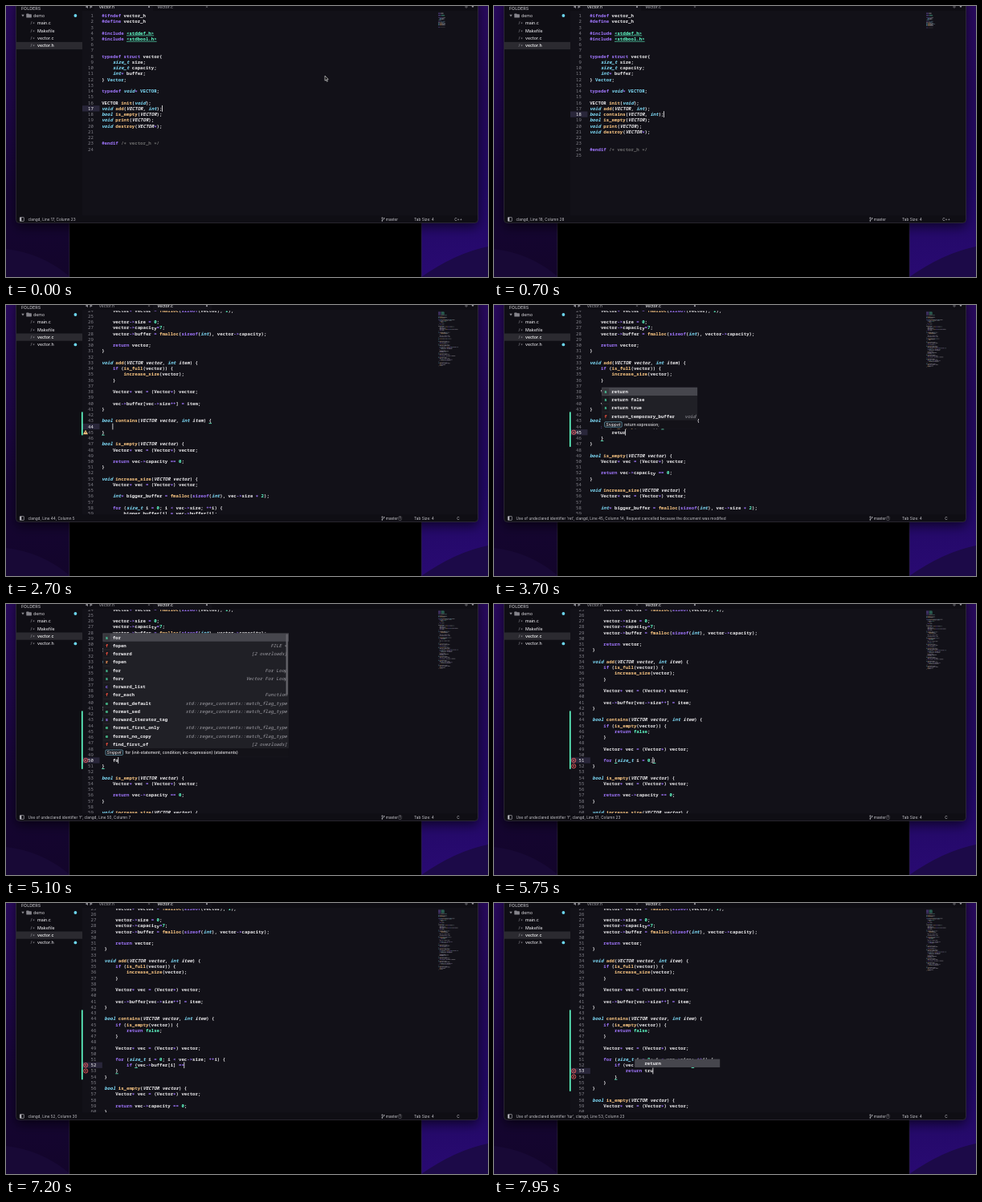
An HTML page with a canvas for the animation above (8000 ms loop, 600 by 338 pixels).

```html
<!DOCTYPE html>
<html lang="en">
<head>
<meta charset="utf-8">
<style>
html, body { margin: 0; width: 100%; height: 100%; overflow: hidden; background: #000; }
canvas { display: block; width: 600px; height: 338px; }
</style>
</head>
<body>
<canvas id="stage"></canvas>
<script>
const LOOP = 8000, TICK = 50, CW = 3.42, ROW = 7.24, SCROLL = 171.8;
const MONO = '"Noto Sans Mono", "DejaVu Sans Mono", monospace', SANS = 'Inter, sans-serif';
const C = { text: '#edecee', purple: '#a277ff', green: '#61ffca', orange: '#ffca85', blue: '#82e2ff', grey: '#6d6d6d', bg: '#121118' };

const canvas = document.getElementById('stage');
const ctx = canvas.getContext('2d');
const dpr = window.devicePixelRatio || 1;
canvas.width = 600 * dpr;
canvas.height = 338 * dpr;

const header = [`#ifndef vector_h
#define vector_h

#include <stddef.h>
#include <stdbool.h>


typedef struct vector{
    size_t size;
    size_t capacity;
    int* buffer;
} Vector;

typedef void* VECTOR;

VECTOR init(void);
void add(VECTOR, int);`, `
bool is_empty(VECTOR);
void print(VECTOR);
void destroy(VECTOR*);


#endif /* vector_h */
`];

const source = [`#include <stdio.h>
#include <stdlib.h>
#include <stdint.h>
#include "vector.h"
`, `
#define LOAD_FACTOR (0.75)`, `

/* private */
void increase_size(VECTOR);
bool is_full(VECTOR);


static void* fmalloc(size_t size, uint8_t length) {
    void* object = malloc(size * length);

    if (object == NULL) {
        exit(1);
    }

    return object;
}

VECTOR init(void) {
    Vector* vector = fmalloc(sizeof(Vector), 1);

    vector->size = 0;
    vector->capacity=7;
    vector->buffer = fmalloc(sizeof(int), vector->capacity);

    return vector;
}

void add(VECTOR vector, int item) {
    if (is_full(vector)) {
        increase_size(vector);
    }

    Vector* vec = (Vector*) vector;

    vec->buffer[vec->size++] = item;
}`, `

bool is_empty(VECTOR vector) {
    Vector* vec = (Vector*) vector;

    return vec->capacity == 0;
}

void increase_size(VECTOR vector) {
    Vector* vec = (Vector*) vector;

    int* bigger_buffer = fmalloc(sizeof(int), vec->size * 2);

    for (size_t i = 0; i < vec->size; ++i) {
        bigger_buffer[i] = vec->buffer[i];
    }

    free(vec->buffer);
    vec->buffer = bigger_buffer;
    vec->capacity *= 2;
}

bool is_full(VECTOR vector) {
    Vector* vec = (Vector*) vector;

    return vec->size >= vec->capacity * LOAD_FACTOR;
}

void print(VECTOR vector) {
    Vector* vec = (Vector*) vector;

    for (size_t i = 0; i < vec->size; ++i) {
        printf("%d ", vec->buffer[i]);
    }
}

void destroy(VECTOR* vector) {
    Vector* vec = (Vector*) *vector;

    free(vec->buffer);
    free(vec);
}
`];

// Each step: start time, ms per key, typed text, text kept after the caret.
const headerKeys = [[50, 24, '\nbool contains(VECTOR, int);', '']];
const sourceKeys = [
  [1900, 16, '\n\nbool contains(VECTOR vector, int item) {', ''],
  [2600, 0, '\n    ', '\n}'],
  [2750, 25, 'if (is_empty(vector)) {', '\n}'],
  [3400, 0, '\n        ', '\n    }\n}'],
  [3500, 50, 'return false;', '\n    }\n}'],
  [4200, 0, '\n    }', '\n}'],
  [4250, 18, '\n\n    Vector* vec = (Vector*) vector;\n\n    ', '\n}'],
  [5050, 40, 'for ', '\n}'],
  [5210, 40, '(size_t i = 0; i < vec->size; ++', ')\n}'],
  [6500, 50, 'i', ')\n}'],
  [6550, 50, ') {', '\n}'],
  [6700, 0, '\n        ', '\n    }\n}'],
  [6750, 22, 'if (vec->buffer[i] == item) {', '\n    }\n}'],
  [7400, 0, '\n            ', '\n        }\n    }\n}'],
  [7500, 50, 'return tru', '\n        }\n    }\n}']
];

const SWITCH = 1050, IMPORT = 5450;

function typed(keys, t) {
  let before = '', after = '';
  for (const [at, ms, text, rest] of keys) {
    if (t < at) break;
    before += text.slice(0, ms ? Math.floor((t - at) / ms) + 1 : text.length);
    after = rest;
  }
  return [before, after];
}

function documentAt(t) {
  if (t < SWITCH) {
    const [a, b] = typed(headerKeys, t);
    return { before: header[0] + a, after: b + header[1] };
  }
  const top = source[0] + (t >= IMPORT ? '#include <stddef.h>\n' : '') + source[1];
  if (t < 1850) return { before: top, after: source[2] + source[3] };
  const [a, b] = typed(sourceKeys, t);
  return { before: top + source[2] + a, after: b + source[3], blockEnd: (top + source[2] + a + b).split('\n').length };
}

// Position of the brackets around the caret, as offsets.
function brackets(all, caret) {
  const open = '([{', close = ')]}';
  let depth = 0, i = caret - 1, j = caret;
  if (close.includes(all[i] || ' ')) { j = i; i--; }
  for (; i >= 0; i--) {
    if (close.includes(all[i])) depth++;
    else if (open.includes(all[i]) && depth-- === 0) break;
  }
  if (i < 0) return [];
  depth = 0;
  for (; j < all.length; j++) {
    if (open.includes(all[j])) depth++;
    else if (close.includes(all[j]) && depth-- === 0) break;
  }
  return [i, j];
}

function tokens(line) {
  const out = [];
  const paren = line.indexOf('(');
  const signature = /^(static|void|bool|VECTOR)\b.*\(/.test(line);
  const re = /\/\*.*?\*\/|"[^"]*"|<\w+\.h>|#\w+|[A-Za-z_]\w*|\d[\d.]*|[-+*=<>]+|[^\s\w]/g;
  for (const m of line.matchAll(re)) {
    const s = m[0], i = m.index;
    let color = C.text, italic = false, under = false;
    if (s.startsWith('/*')) color = C.grey;
    else if (/^["<]\w/.test(s)) { color = C.green; under = line[0] === '#'; }
    else if (/^(#\w+|typedef|struct|static|return|if|for|sizeof)$/.test(s)) color = C.purple;
    else if (/^(void|int|bool|size_t|uint8_t)$/.test(s)) { color = C.blue; italic = true; }
    else if (/^(\d|NULL$|true$|false$)/.test(s)) color = C.green;
    else if (/^[-+*=<>]/.test(s)) color = C.purple;
    else if (/^\w/.test(s)) {
      if (/^(typedef void|})/.test(line)) color = C.blue;
      else if (line[i + s.length] === '(') color = C.orange;
      else italic = signature && i > paren;
    }
    out.push({ s, i, color, italic, under });
  }
  return out;
}

function rect(x, y, w, h, color) {
  ctx.fillStyle = color;
  ctx.fillRect(x, y, w, h);
}

function round(x, y, w, h, r, fill, stroke) {
  ctx.beginPath();
  ctx.roundRect(x, y, w, h, r);
  if (fill) { ctx.fillStyle = fill; ctx.fill(); }
  if (stroke) { ctx.strokeStyle = stroke; ctx.lineWidth = 0.6; ctx.stroke(); }
}

function dot(x, y, r, color) {
  ctx.beginPath();
  ctx.arc(x, y, r, 0, 7);
  ctx.fillStyle = color;
  ctx.fill();
}

function stroke(points, color, width = 0.7) {
  ctx.beginPath();
  points.forEach(([x, y], i) => i ? ctx.lineTo(x, y) : ctx.moveTo(x, y));
  ctx.strokeStyle = color;
  ctx.lineWidth = width;
  ctx.stroke();
}

function poly(points, color) {
  ctx.beginPath();
  points.forEach(([x, y]) => ctx.lineTo(x, y));
  ctx.closePath();
  ctx.fillStyle = color;
  ctx.fill();
}

// Scaling and an invisible tilt keep small type off the pixel grid.
function label(s, x, y, size, color, { style = '', family = SANS, align = 'left' } = {}) {
  ctx.save();
  ctx.translate(x, y + size * 0.36);
  ctx.rotate(0.0004);
  ctx.scale(0.1, 0.1);
  ctx.font = `${style} ${size * 10}px ${family}`;
  ctx.textAlign = align;
  ctx.fillStyle = color;
  ctx.fillText(s, 0, 0);
  ctx.restore();
}

const mono = (s, x, y, color, { style = '600', ...opts } = {}) =>
  label(s.replace(/\*/g, '∗'), x, y, 5.7, color, { family: MONO, style, ...opts });

function cross(x, y, r, color) {
  stroke([[x - r, y - r], [x + r, y + r]], color);
  stroke([[x + r, y - r], [x - r, y + r]], color);
}

function gradient(x0, y0, x1, y1, ...stops) {
  const g = ctx.createLinearGradient(x0, y0, x1, y1);
  stops.forEach((color, i) => g.addColorStop(i / (stops.length - 1), color));
  return g;
}

function wallpaper() {
  rect(0, 0, 300, 338, gradient(0, 0, 0, 338, '#28095c', '#1f074b', '#150533', '#13052b'));
  rect(300, 0, 300, 338, gradient(0, 0, 0, 338, '#28095c', '#220858', '#200862', '#290a72'));
  ctx.beginPath();
  ctx.moveTo(0, 303);
  ctx.quadraticCurveTo(45, 308, 80, 338);
  ctx.lineTo(0, 338);
  ctx.fillStyle = '#180936';
  ctx.fill();
  ctx.beginPath();
  ctx.moveTo(517, 338);
  ctx.quadraticCurveTo(560, 308, 600, 300);
  ctx.lineTo(600, 338);
  ctx.fillStyle = '#1c0a48';
  ctx.fill();
  rect(79, 262, 438, 76, '#000');
  stroke([[78.8, 262], [78.8, 338]], '#2c2638');
  stroke([[517.2, 262], [517.2, 338]], '#2c2638');
  ctx.save();
  ctx.shadowColor = 'rgba(0,0,0,.6)';
  ctx.shadowBlur = 14 * dpr;
  ctx.shadowOffsetY = 5 * dpr;
  round(12.5, -10, 575, 280.5, 4, C.bg);
  ctx.restore();
}

function sidebar(t) {
  rect(13, 0, 82, 261, '#0f0e14');
  label('FOLDERS', 19, 2.6, 5.3, '#a5a4aa', { style: '600' });
  poly([[19.3, 10.8], [22.7, 10.8], [21, 13.4]], '#8b8a91');
  round(25.3, 9.6, 3.2, 2, 0.5, '#85848b');
  round(25.3, 10.3, 6.6, 4.3, 0.6, '#85848b');
  label('demo', 34, 12.2, 5.3, '#dddce0');
  dot(86.4, 12, 1.9, '#6bd5ee');
  const active = t < SWITCH ? 3 : 2;
  ['main.c', 'Makefile', 'vector.c', 'vector.h'].forEach((name, i) => {
    const y = 21.3 + i * 9.4;
    if (i === active) rect(13, y - 4.6, 82, 9.2, '#2b2a30');
    label('/∗', 30, y, 5, '#a09fa6', { family: MONO });
    label(name, 39, y, 5.3, i === active ? '#fff' : '#dddce0', { style: '500' });
  });
  if (t >= 900) dot(86.4, 49.4, 1.9, '#6bd5ee');
}

function tabs(t) {
  const first = t < SWITCH;
  rect(95, 0, 492, 6, '#0e0d13');
  rect(first ? 110 : 183, 0, 73, 6, C.bg);
  poly([[102, -1], [102, 3], [98.6, 1]], '#88878e');
  poly([[104.5, -1], [104.5, 3], [107.9, 1]], '#88878e');
  label('vector.h', 116, 0.9, 5, first ? '#fff' : '#a3a2a8');
  label('vector.c', 188.5, 0.9, 5, first ? '#a3a2a8' : '#fff', { style: '500' });
  const mark = (x, dirty) => dirty ? dot(x, 1.2, 1.1, '#96959c') : cross(x, 1.2, 1, '#6f6e75');
  mark(178, t < 800);
  mark(250, t >= 1900);
  stroke([[571, 1], [575, 1]], '#77767d');
  stroke([[573, -1], [573, 3]], '#77767d');
  poly([[579.5, 0], [582.5, 0], [581, 2.2]], '#98979e');
}

function errorMark(y) {
  ctx.beginPath();
  ctx.arc(99.2, y, 2.6, 0, 7);
  ctx.strokeStyle = '#ff6767';
  ctx.lineWidth = 0.8;
  ctx.stroke();
  cross(99.2, y, 1.1, '#ff6767');
}

function warningMark(y) {
  poly([[99, y - 3], [102, y + 2.5], [96, y + 2.5]], '#ffca85');
  stroke([[99, y - 1.2], [99, y + 1]], '#302818', 0.8);
}

function editor(t, doc) {
  const all = doc.before + doc.after, lines = all.split('\n');
  const shift = t >= IMPORT ? CW : 0, x0 = 119.2 + shift;
  const p = Math.min(1, Math.max(0, (t - 1520) / 180));
  const scroll = t < SWITCH ? 0 : SCROLL * p * p * (3 - 2 * p) + (shift ? ROW : 0);
  const rowY = i => 12 + i * ROW - scroll;
  const place = offset => {
    const part = all.slice(0, offset).split('\n');
    return { row: part.length - 1, col: part.at(-1).length };
  };
  const caret = place(doc.before.length);
  const cy = rowY(caret.row), cx = x0 + caret.col * CW;

  ctx.save();
  ctx.beginPath();
  ctx.rect(94, 7.2, 493, 253.8);
  ctx.clip();
  rect(95, cy - 3.6, 21.5 + shift, ROW, '#29263a');

  if (doc.blockEnd && t >= 1900) {
    const top = rowY(t >= IMPORT ? 42 : 41) - 3.6;
    rect(94, top, 1.6, Math.max(0, rowY(doc.blockEnd - 1) + 3.6 - top), C.green);
  }

  lines.forEach((line, i) => {
    const y = rowY(i), toks = tokens(line);
    if (y > 0 && y < 268) {
      mono(String(i + 1), 108.9 + shift, y, i === caret.row ? '#fff' : '#85848c', { align: 'right', style: '500' });
      for (const k of toks) {
        const x = x0 + k.i * CW;
        mono(k.s, x, y, k.color, { style: k.italic ? 'italic 600' : '600' });
        if (k.under) rect(x, y + 2.9, k.s.length * CW, 0.6, k.color);
      }
    }
    ctx.globalAlpha = 0.5;
    for (const k of toks) rect(538 + k.i * 0.41, 8.6 + i * 0.79, k.s.length * 0.41, 0.55, k.color);
    ctx.globalAlpha = 1;
  });

  for (const b of brackets(all, doc.before.length)) {
    const q = place(b);
    rect(x0 + q.col * CW, rowY(q.row) + 3, CW, 0.8, C.green);
  }
  rect(cx - 0.4, cy - 3.9, 0.8, 7.8, '#f4f3f6');

  if (t >= 2600 && t < 2800) warningMark(cy + ROW);
  if ((t >= 3550 && t < 4150) || t >= 5050) errorMark(cy);
  if (t >= 5500) errorMark(cy + ROW);
  ctx.restore();
  return { caret, cx, cy };
}

const returnItems = ['s return', 's return false', 's return true', 'f return_temporary_buffer|void'];
const MATCH = '|std::regex_constants::match_flag_type';
const forItems = ['s for', 'f fopen|FILE *', 'f forward|[2 overloads]', 'r fopen', 's for|For Loop', 's forv|Vector For Loop',
  'c forward_list', 'f for_each|Function', 'e format_default' + MATCH, 'e format_sed' + MATCH, 't forward_iterator_tag',
  'e format_first_only' + MATCH, 'e format_no_copy' + MATCH, 'f find_first_of|[2 overloads]'];
const kinds = { s: '#4fe0ac', f: '#f4503f', r: '#ff9c5a', c: '#8f6bff', e: '#55ecac', t: '#a277ff' };

function popup(items, wordX, lineY, width, note) {
  const pitch = 10.25, left = wordX - 12.4, foot = note ? 10.5 : 0;
  const h = items.length * pitch + foot, top = lineY - 4.5 - h;
  rect(left, top, width, h, '#202026');
  rect(left, top, width, pitch, '#46464d');
  items.forEach((item, i) => {
    const [name, info] = item.slice(2).split('|');
    const y = top + (i + 0.5) * pitch, kind = item[0];
    if (kinds[kind]) {
      rect(left + 1, y - 4.3, 8, 8.6, 'rgba(0,0,0,.22)');
      mono(kind === 't' ? 's' : kind, left + 3.2, y, kinds[kind], { style: 'bold' });
    }
    mono(name, wordX - 0.2, y, '#f1f0f3', { style: 'bold' });
    if (info) mono(info, left + width - 2, y, '#a2a1a8', { style: 'italic 500', align: 'right' });
  });
  if (items.length > 8) round(left + width - 3.4, top + 1, 2.2, 76, 1, '#66656c');
  if (note) {
    const y = top + h - foot / 2;
    rect(left, top + h - foot, width, foot, '#131218');
    round(left + 3.5, y - 3.2, 21.5, 6.4, 1, null, '#82cbe2');
    label('Snippet', left + 14.2, y, 5, '#e8e7ea', { style: 'italic 500', align: 'center' });
    label(note, left + 28, y, 5, '#e8e7ea', { style: '500' });
  }
}

function popups(t, { cx, cy }) {
  if (t >= 3550 && t < 3850) popup(returnItems, cx - CW * (Math.floor((t - 3500) / 50) + 1), cy, 119, 'return expression;');
  if (t >= 5050 && t < 5170) popup(forItems, cx - CW * (Math.floor((t - 5050) / 40) + 1), cy, 231.5, 'for (init-statement; condition; inc-expression) (statements)');
  if (t >= 7850) popup(['- return'], cx - CW * (Math.floor((t - 7850) / 50) + 1), cy, 106);
}

function statusBar(t, { caret }) {
  rect(13, 261.3, 574, 8.7, '#0f0e14');
  round(17.3, 263.6, 5, 4.8, 0.5, null, '#c5c4ca');
  rect(17.5, 263.8, 1.7, 4.4, '#c5c4ca');
  let s = `clangd, Line ${caret.row + 1}, Column ${caret.col + 1}`;
  if (t >= 800 && t < 1900) s += '; Saved ~/demo/vector.h (UTF-8)';
  const wrong = t >= 7900 ? 'tur' : t >= 6000 && t < 6700 ? 'O' : t >= 5100 && t < 6000 ? 'f' : t >= 3600 && t < 4150 ? 'ret' : '';
  if (wrong) s = `Use of undeclared identifier '${wrong}', ${s}`;
  if (wrong === 'ret' && t < 3800) s += '; Request cancelled because the document was modified';
  const ink = '#c9c8ce';
  label(s, 27.5, 266, 4.7, ink);
  dot(468.3, 264.2, 0.7, ink);
  dot(468.3, 268, 0.7, ink);
  dot(470.6, 264.8, 0.7, ink);
  stroke([[468.3, 264], [468.3, 268]], ink, 0.5);
  stroke([[470.6, 265], [470.1, 266.4], [468.3, 266.8]], ink, 0.5);
  label('master', 472.8, 266, 4.7, ink);
  if (t >= 900) {
    round(488.6, 263.7, 3.6, 4.8, 1, null, '#6f6e75');
    label('1', 490.4, 266.1, 3.6, ink, { align: 'center' });
  }
  label('Tab Size: 4', 508, 266, 4.75, ink);
  label(t < SWITCH ? 'C++' : 'C', 563, 266, 4.7, ink, { align: 'center' });
}

const pointerPath = [[0, 397, 87], [750, 397, 87], [1000, 200, 2], [1100, 200, 2], [1450, 178, 193], [1600, 178, 193], [1800, 124, 130], [1900, 124, 130]];

function pointer(t) {
  if ((t >= 50 && t < 750) || t >= 1900) return;
  const k = pointerPath.findIndex(p => p[0] > t);
  const [ta, xa, ya] = pointerPath[k - 1], [tb, xb, yb] = pointerPath[k];
  const u = (t - ta) / (tb - ta), e = u * u * (3 - 2 * u);
  const x = xa + (xb - xa) * e, y = ya + (yb - ya) * e;
  if (t < 1150) {
    const shape = [[0, 0], [0, 6.2], [1.4, 5], [2.4, 7.2], [3.4, 6.8], [2.4, 4.6], [4.2, 4.4]].map(([a, b]) => [x + a, y + b]);
    poly(shape, '#111');
    stroke([...shape, shape[0]], '#eee', 0.6);
  } else {
    for (const [color, w] of [['#000', 1.8], ['#eee', 0.8]]) {
      stroke([[x, y - 3], [x, y + 3]], color, w);
      stroke([[x - 1.6, y - 3.4], [x + 1.6, y - 3.4]], color, w);
      stroke([[x - 1.6, y + 3.4], [x + 1.6, y + 3.4]], color, w);
    }
  }
}

function draw(t) {
  ctx.setTransform(dpr, 0, 0, dpr, 0, 0);
  wallpaper();
  ctx.save();
  ctx.beginPath();
  ctx.roundRect(12.5, -10, 575, 280.5, 4);
  ctx.clip();
  sidebar(t);
  tabs(t);
  const view = editor(t, documentAt(t));
  popups(t, view);
  statusBar(t, view);
  ctx.restore();
  round(12.5, -10, 575, 280.5, 4, null, '#3b3844');
  pointer(t);
}

function frame() {
  draw(Math.floor(performance.now() % LOOP / TICK) * TICK);
  requestAnimationFrame(frame);
}
frame();
</script>
</body>
</html>
```
